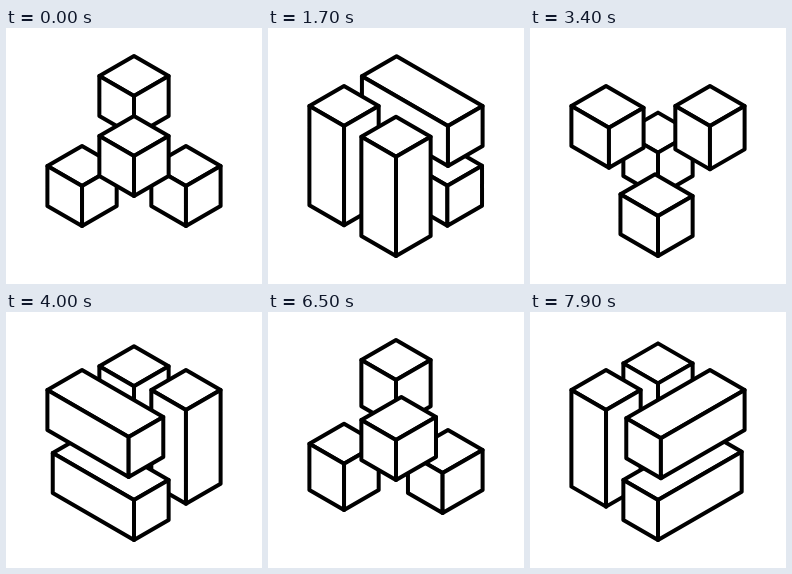
An HTML page with a canvas for the animation above (8000 ms loop, 256x256 px).

```html
<!DOCTYPE html>
<html lang="en">
<head>
<meta charset="utf-8">
<title>Isometric blocks</title>
<style>
  html, body { margin: 0; width: 100%; height: 100%; overflow: hidden; background: #fff; }
  canvas { display: block; }
</style>
</head>
<body>
<canvas id="stage" width="256" height="256"></canvas>
<script>
const ctx = document.getElementById('stage').getContext('2d');
const LOOP = 8000, STEP = 100, PHASE = 3000;
const EDGE = 40, PITCH = 60, COS30 = Math.sqrt(3) / 2;

// Moves between cells of a 2x2x2 grid (xyz), listed back to front.
const phases = [
  ['100>000', '001>101', '010>011', '111>110'],
  ['000>001', '101>100', '110>010', '011>111'],
  ['001>000', '010>011', '100>110', '111>101']
].map(moves => moves.map(move => move.split('>').map(cell => [...cell].map(Number))));

// cubic-bezier(.8, 0, .2, 1)
function ease(x) {
  if (x <= 0 || x >= 1) return Math.min(1, Math.max(0, x));
  const curve = (s, a, b) => 3 * s * (1 - s) ** 2 * a + 3 * s * s * (1 - s) * b + s ** 3;
  let lo = 0, hi = 1;
  for (let i = 0; i < 30; i++) {
    const mid = (lo + hi) / 2;
    if (curve(mid, 0.8, 0.2) < x) lo = mid; else hi = mid;
  }
  return curve(lo, 0, 1);
}

const project = ([x, y, z]) => [128 + COS30 * (x - y), 128 + (x + y) / 2 - z];

function face(...corners) {
  ctx.beginPath();
  corners.forEach(p => ctx.lineTo(...project(p)));
  ctx.closePath();
  ctx.fill();
  ctx.stroke();
}

function box([x, y, z], [X, Y, Z]) {
  face([x, y, Z], [X, y, Z], [X, Y, Z], [x, Y, Z]);
  face([x, Y, Z], [X, Y, Z], [X, Y, z], [x, Y, z]);
  face([X, y, Z], [X, Y, Z], [X, Y, z], [X, y, z]);
}

function draw(time) {
  const u = time % PHASE / (PHASE / 2);
  const head = ease(u), tail = ease(u - 1);
  ctx.fillStyle = '#fff';
  ctx.strokeStyle = '#000';
  ctx.lineWidth = 4;
  ctx.lineJoin = 'round';
  ctx.fillRect(0, 0, 256, 256);
  for (const [from, to] of phases[Math.floor(time / PHASE)]) {
    const at = k => from.map((v, i) => PITCH * (v + (to[i] - v) * k));
    const a = at(tail), b = at(head);
    box(a.map((v, i) => Math.min(v, b[i])), a.map((v, i) => Math.max(v, b[i]) + EDGE));
  }
}

function tick() {
  const time = performance.now() % LOOP;
  draw(Math.floor(time / STEP) * STEP);
  requestAnimationFrame(tick);
}
tick();
</script>
</body>
</html>
```
